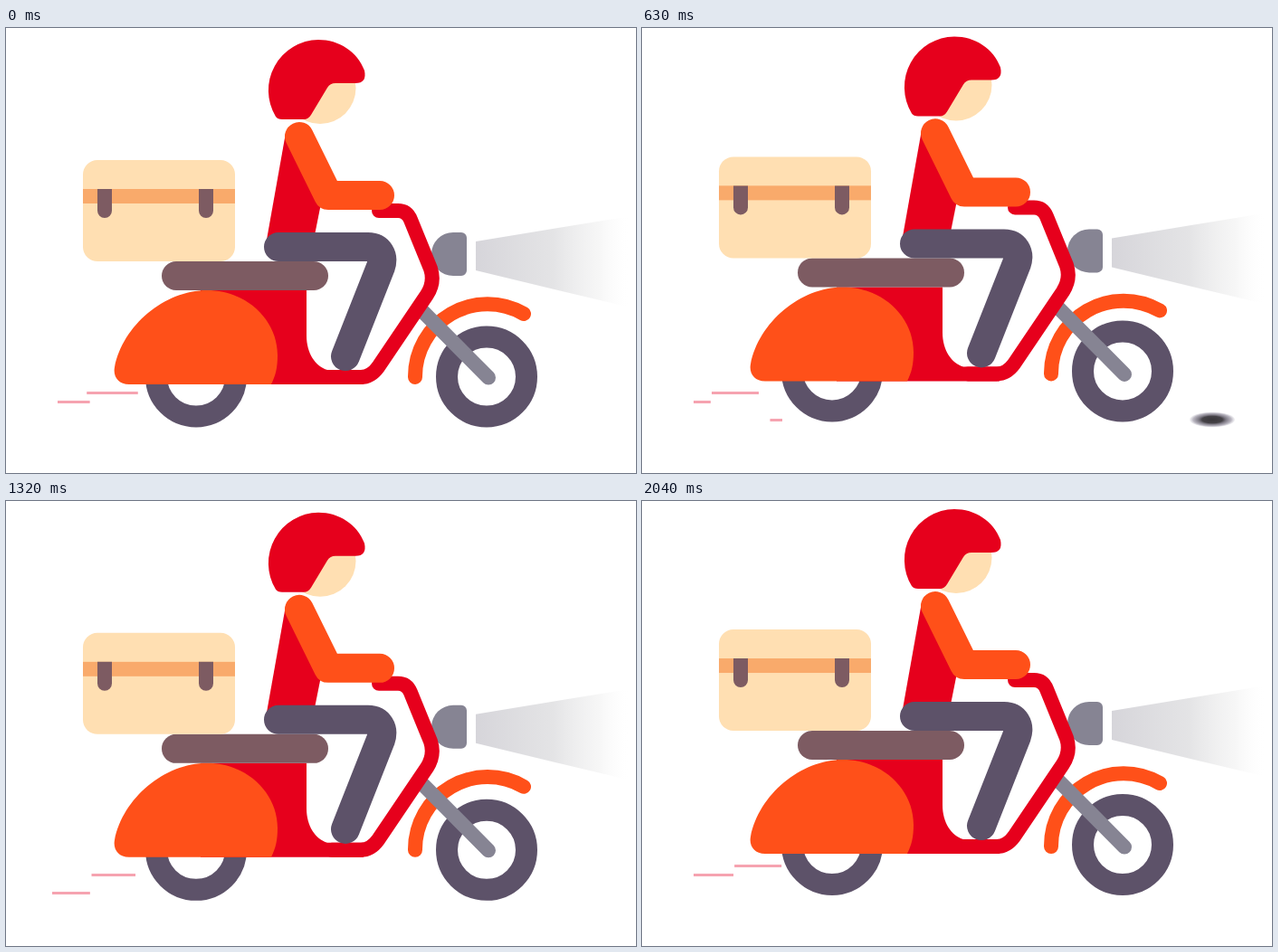
Recreate the animation shown at these times as an HTML page. Size 696 px wide and 492 px high, loop 2.07 s.

```html
<!DOCTYPE html>
<html lang="en">
<head>
<meta charset="utf-8">
<title>Delivery scooter</title>
<style>
  html, body { margin: 0; width: 100%; height: 100%; overflow: hidden; background: #fff; }
  svg { display: block; width: 696px; height: 492px; }
  .red { fill: #e6001c; }
  .orange { fill: #ff5019; }
  .skin { fill: #ffdfb2; }
  .brown { fill: #7d5b62; }
  .gray { fill: #868493; }
  .limb { fill: none; stroke-linecap: round; stroke-linejoin: round; }
</style>
</head>
<body>
<svg viewBox="0 0 696 492">
  <defs>
    <linearGradient id="glow" gradientUnits="userSpaceOnUse" x1="519" y1="0" x2="690" y2="0">
      <stop offset="0" stop-color="#d6d5da"/>
      <stop offset=".5" stop-color="#dfdfe1" stop-opacity=".85"/>
      <stop offset=".8" stop-color="#ececec" stop-opacity=".45"/>
      <stop offset="1" stop-color="#fff" stop-opacity="0"/>
    </linearGradient>
    <radialGradient id="hole">
      <stop offset="0" stop-color="#39363a"/>
      <stop offset=".45" stop-color="#454247"/>
      <stop offset=".6" stop-color="#7d7984"/>
      <stop offset=".85" stop-color="#bdbac4"/>
      <stop offset="1" stop-color="#e6e5ea" stop-opacity=".5"/>
    </radialGradient>
  </defs>

  <g id="streaks" stroke="#f6a3b0" stroke-width="3"></g>
  <ellipse id="pothole" cy="433" rx="25" ry="8.5" fill="url(#hole)"/>

  <g id="scooter">
    <g id="wheels" fill="none" stroke="#5d5269" stroke-width="24">
      <circle cx="210" r="44"/>
      <circle cx="531" r="44"/>
    </g>
    <g id="body">
      <path id="beam" fill="url(#glow)" d="M519 232L610 217 690 204V305L610 286 519 264z"/>
      <path class="gray" d="M494 222H503a6 6 0 0 1 6 6V264a6 6 0 0 1-6 6H494a24 24 0 0 1 0-48z"/>
      <path class="limb" stroke="#ff5019" stroke-width="16" d="M452 382A80 80 0 0 1 572 312"/>
      <path class="limb" stroke="#868493" stroke-width="16" d="M458 307L533 382.5"/>
      <path class="red" d="M215 286H332V336C332 356 342 370 355 374H395V390H215z"/>
      <path class="limb" stroke="#e6001c" stroke-width="16"
        d="M412 198H433Q443 198 447 208L469 262Q474 277 465 291L411 371Q403 382 392 382H360"/>
      <path class="orange" d="M136 390C124 390 118 381 120 371C129 325 175 286 222 286C265 286 300 318 300 358C300 371 298 380 293 390z"/>
      <rect class="brown" x="172" y="254" width="184" height="32" rx="16"/>
      <g id="box">
        <rect class="skin" x="85" y="142" width="168" height="112" rx="16"/>
        <rect fill="#f9aa6b" x="85" y="174" width="168" height="16"/>
        <path class="brown" d="M101 174h16v24a8 8 0 0 1-16 0zM213 174h16v24a8 8 0 0 1-16 0z"/>
      </g>
      <path class="red" d="M309 112H330L350 180 340 230H288z"/>
      <path class="limb" stroke="#5d5269" stroke-width="32" d="M301 238H400C412 238 418 248 414 260L375 359"/>
      <path class="limb" stroke="#ff5019" stroke-width="32" d="M324 116L356 181H413"/>
      <circle class="skin" cx="347" cy="62.5" r="39.5"/>
      <path id="helmet" class="red"
        d="M305 97Q300 97 298 94A56 56 0 0 1 345 9C368 9 388 22 396 43Q399 57 386 57H364Q358 57 355 62L337 92Q334 97 329 97z"/>
    </g>
  </g>
</svg>
<script>
const STEP = 30, COUNT = 69, BOB = 15;
const $ = id => document.getElementById(id);
const clamp = (v, lo, hi) => Math.min(hi, Math.max(lo, v));
const wave = n => Math.cos(2 * Math.PI * n / BOB);
const hump = (n, mid, half) =>
  Math.abs(n - mid) < half ? Math.cos(Math.PI / 2 * (n - mid) / half) ** 2 : 0;

// Each streak draws from right to left; its tail follows more slowly.
const streakKinds = [
  { y: 403.5, from: 155, to: 77, head: -5.1, tail: -1.1 },
  { y: 413.5, from: 159, to: 57, head: -11, tail: -7.9 },
  { y: 433.5, from: 155, to: 51, head: 0.95, tail: 3.6 }
];
const passes = [0, 19, 33, 50];
const streaks = passes.flatMap(start => streakKinds.map(kind => {
  const line = document.createElementNS("http://www.w3.org/2000/svg", "line");
  line.setAttribute("y1", kind.y);
  line.setAttribute("y2", kind.y);
  $("streaks").append(line);
  return { ...kind, start, line };
}));

function drawStreak({ from, to, head, tail, start, line }, n) {
  const age = (n - start + 12 + COUNT) % COUNT - 12;
  const left = clamp(from - 12.9 * (age - head), to, from);
  const right = clamp(from - 8.4 * (age - tail), to, from);
  line.setAttribute("x1", left);
  line.setAttribute("x2", right);
  line.style.display = right - left > 0.5 ? "" : "none";
}

function draw(n) {
  const move = (id, value) => $(id).setAttribute("transform", value);
  const bump = hump(n, 28, 5);
  const hop = hump(n, 36.5, 4.5);

  streaks.forEach(s => drawStreak(s, n));
  $("pothole").setAttribute("cx", 630 - 35.1 * (n - 21));
  $("pothole").style.display = n >= 19 && n <= 38 ? "" : "none";

  move("scooter", `rotate(${-3.83 * bump} 306 290)`);
  move("wheels", `translate(0 ${382.6 + 3.2 * wave(n + 1)})`);
  move("body", `translate(0 ${2 + 2 * wave(n)})`);
  move("helmet", `rotate(${-14.4 * bump} 301 88)`);
  move("box", `translate(0 ${-19 * hop}) rotate(${3.6 * hop} 169 198)`);
  $("beam").setAttribute("opacity", 1 - 0.8 * bump);
}

const began = performance.now();
function tick() {
  draw(Math.floor((performance.now() - began) / STEP) % COUNT);
  requestAnimationFrame(tick);
}
tick();
</script>
</body>
</html>
```
